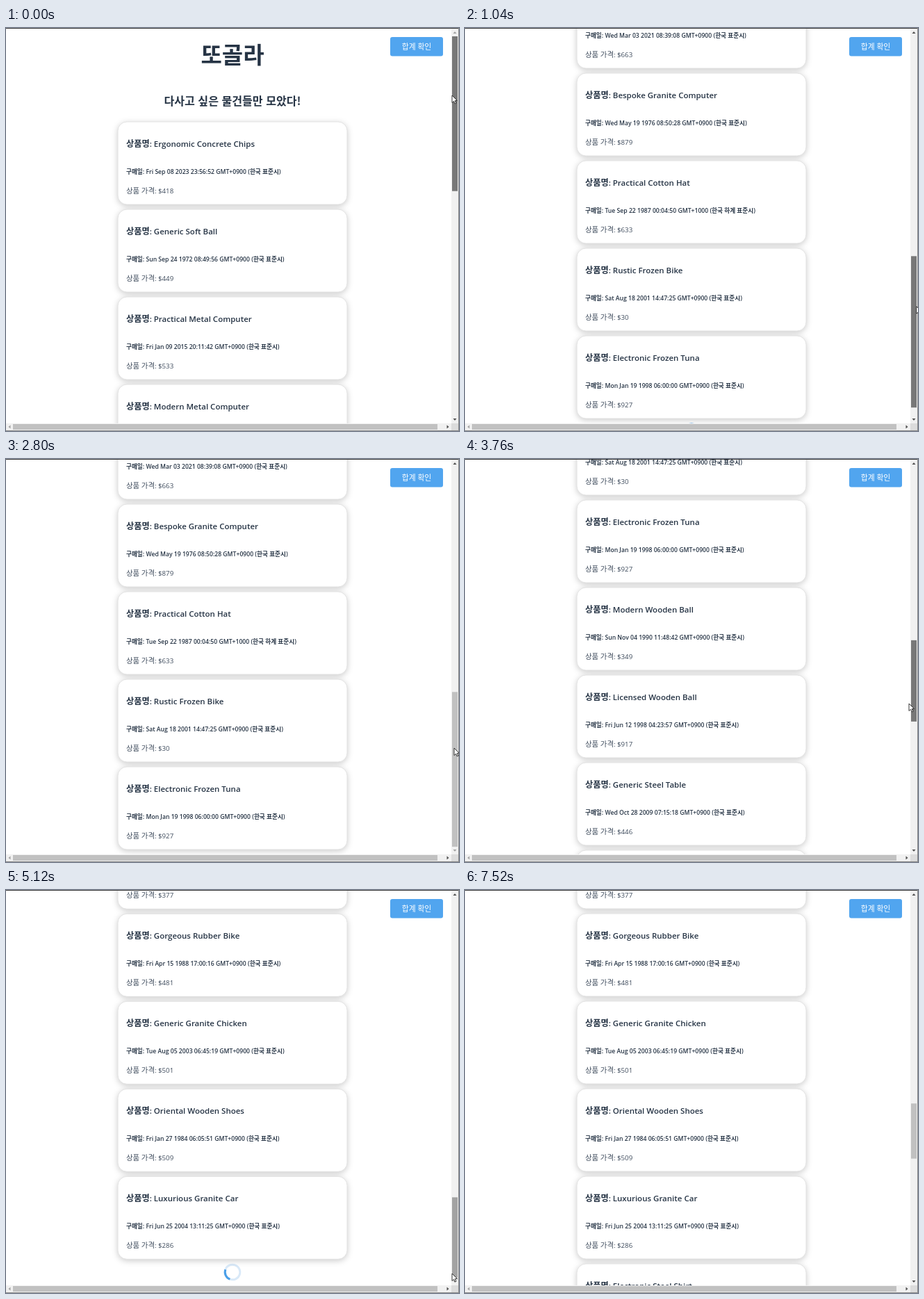
An HTML page for the animation above (7600 ms loop, 652x580 px).

```html
<!DOCTYPE html>
<html lang="ko">
<head>
<meta charset="utf-8">
<style>
  html, body { margin: 0; width: 100%; height: 100%; overflow: hidden; background: #fff; }
  svg { display: block; width: 652px; height: 580px; }
  text { font-family: 'Open Sans', 'Noto Sans', 'Noto Sans CJK KR', 'Noto Sans CJK', sans-serif; fill: #263445; white-space: pre; }
  .bold { font-weight: 600; }
  .heading { font-weight: 700; text-anchor: middle; font-family: 'Noto Sans CJK KR', 'Noto Sans CJK', sans-serif; }
  .price { fill: #3f4c5d; }
  .card { fill: #fff; stroke: #e2e2e2; filter: drop-shadow(0 2px 4.5px rgba(0, 0, 0, .2)); }
</style>
</head>
<body>
<svg id="stage" viewBox="0 0 652 580">
  <defs><clipPath id="view"><rect y="1" width="641" height="568"/></clipPath></defs>
  <g clip-path="url(#view)">
    <g id="page">
      <text class="heading" x="326" y="51" font-size="33">또골라</text>
      <text class="heading" x="326" y="111" font-size="16.1">다사고 싶은 물건들만 모았다!</text>
      <g id="spinner" fill="none" stroke-width="3">
        <circle r="10.8" stroke="#d9e9f8"/>
        <path d="M-7.64-7.64A10.8 10.8 0 0 1 7.64-7.64" stroke="#4a9fe8"/>
      </g>
    </g>
    <rect x="553" y="13" width="76" height="27.5" rx="3" fill="#51a5ef"/>
    <text x="591" y="31" font-size="10.8" text-anchor="middle" style="fill:#fff">합계 확인</text>
  </g>
  <path d="M641 1h11v568h-11zM0 569h641v11H0z" fill="#f1f1f1"/>
  <rect x="641" y="569" width="11" height="11" fill="#dcdcdc"/>
  <rect x="10" y="570" width="611" height="8" fill="#c1c1c1"/>
  <path d="M6.500 571.500v5l-3-2.500z" fill="#a3a3a3"/>
  <path d="M634.500 571.500v5l3-2.500z" fill="#505050"/>
  <path id="up" d="M643.500 8h5l-2.500-3z"/>
  <path id="down" d="M643.500 562h5l-2.500 3z"/>
  <rect id="thumb" x="642" width="8"/>
  <path d="M0 .5H652" stroke="#3c3c3c"/>
  <path d="M651.500 0V580M0 579.500H652" stroke="#8a8a8a"/>
  <path id="cursor" d="M0 0V10.500L2.500 8.300 4.200 12 5.900 11.200 4.200 7.600H7.500Z" fill="#fff" stroke="#222" stroke-width=".9"/>
</svg>
<script>
const LOOP = 7600, STEP = 80, VIEW = 569, TRACK = 546, TRACK_TOP = 12;
const FIRST = 135, PITCH = 126, BATCH = 10, SPINNER_SPACE = 30.7;

const items = `Ergonomic Concrete Chips|Fri Sep 08 2023 23:56:52|418
Generic Soft Ball|Sun Sep 24 1972 08:49:56|449
Practical Metal Computer|Fri Jan 09 2015 20:11:42|533
Modern Metal Computer|Wed Mar 02 2016 02:26:23|623
Ergonomic Cotton Computer|Sat Jul 02 2016 18:54:19|513
Rustic Soft Soap|Wed Mar 03 2021 08:39:08|663
Bespoke Granite Computer|Wed May 19 1976 08:50:28|879
Practical Cotton Hat|Tue Sep 22 1987 00:04:50|633|summer
Rustic Frozen Bike|Sat Aug 18 2001 14:47:25|30
Electronic Frozen Tuna|Mon Jan 19 1998 06:00:00|927
Modern Wooden Ball|Sun Nov 04 1990 11:48:42|349
Licensed Wooden Ball|Fri Jun 12 1998 04:23:57|917
Generic Steel Table|Wed Oct 28 2009 07:15:18|446
Handmade Cotton Chair|Mon May 14 2012 10:32:07|725
Modern Rubber Gloves|Thu Feb 17 2005 21:08:33|158
Practical Steel Pizza|Sat Dec 07 1996 03:41:29|377
Gorgeous Rubber Bike|Fri Apr 15 1988 17:00:16|481
Generic Granite Chicken|Tue Aug 05 2003 06:45:19|501
Oriental Wooden Shoes|Fri Jan 27 1984 06:05:51|509
Luxurious Granite Car|Fri Jun 25 2004 13:11:25|286
Electronic Steel Shirt|Tue Apr 09 2013 15:22:40|394`.split('\n').map(line => line.split('|'));

const $ = id => document.getElementById(id);

function add(parent, tag, attrs, text = '') {
  const el = document.createElementNS('http://www.w3.org/2000/svg', tag);
  for (const key in attrs) el.setAttribute(key, attrs[key]);
  el.textContent = text;
  return parent.appendChild(el);
}

function labelled(parent, cls, y, koSize, latinSize, label, value) {
  const line = add(parent, 'text', { class: cls, x: 173, y });
  add(line, 'tspan', { 'font-size': koSize }, label);
  add(line, 'tspan', { 'font-size': latinSize }, ': ' + value);
}

const cards = items.map(([name, date, price, summer], i) => {
  const g = add($('page'), 'g', { transform: `translate(0 ${FIRST + i * PITCH})` });
  add(g, 'rect', { class: 'card', x: 161, y: 0, width: 330, height: 119, rx: 13 });
  labelled(g, 'bold', 36, 12.2, 11.5, '상품명', name);
  const zone = summer ? 'GMT+1000 (한국 하계 표준시)' : 'GMT+0900 (한국 표준시)';
  labelled(g, 'bold', 75, 8.65, 8.65, '구매일', `${date} ${zone}`);
  labelled(g, 'price', 103, 10.4, 9.7, '상품 가격', '$' + price);
  return g;
});

// Keys are [time, ...values], joined by straight lines; the scroll is also held to the page end.
const scrollKeys = [[0, 0], [320, 62], [640, 223], [1040, 826], [1120, 857], [2640, 857], [3200, 826],
  [3760, 1210], [4440, 2086], [4480, 2117]];
const cursorKeys = [[0, 642, 97], [640, 648, 204], [1120, 650, 440], [1520, 651, 504], [2000, 654, 500],
  [2640, 650, 450], [2800, 645, 416], [3200, 642, 273], [3760, 639, 352], [4480, 641, 537],
  [5120, 642, 552], [5760, 642, 552], [6080, 656, 540]];
const thumbColours = [[0, '#787878'], [1280, '#a3a3a3'], [1760, '#c1c1c1'], [3120, '#787878'],
  [4800, '#a3a3a3'], [5920, '#c1c1c1']];
const spinners = [[1040, 2640], [4440, 5840]];
const loads = [2960, 5840];

function sample(keys, t) {
  const i = keys.findIndex(k => k[0] > t);
  if (i < 0) return keys[keys.length - 1].slice(1);
  const a = keys[i - 1], b = keys[i], p = (t - a[0]) / (b[0] - a[0]);
  return a.slice(1).map((v, n) => v + (b[n + 1] - v) * p);
}

function draw(t) {
  const count = BATCH * (1 + loads.filter(at => t >= at).length);
  const spin = spinners.find(([from, to]) => t >= from && t < to);
  const total = FIRST + count * PITCH + (spin ? SPINNER_SPACE : 0);
  const limit = total - VIEW;
  const scroll = Math.min(sample(scrollKeys, t)[0], limit);

  $('page').setAttribute('transform', `translate(0 ${-scroll})`);
  cards.forEach((card, i) => card.setAttribute('display', i < count ? 'inline' : 'none'));
  $('spinner').setAttribute('display', spin ? 'inline' : 'none');
  if (spin) {
    const y = FIRST + count * PITCH + 11.7;
    $('spinner').setAttribute('transform', `translate(326 ${y}) rotate(${(t - spin[0]) * .36})`);
  }

  const thumb = $('thumb');
  thumb.setAttribute('y', TRACK_TOP + scroll * TRACK / total);
  thumb.setAttribute('height', VIEW * TRACK / total);
  thumb.setAttribute('fill', thumbColours.filter(([at]) => t >= at).pop()[1]);
  $('up').setAttribute('fill', scroll > 0 ? '#505050' : '#a3a3a3');
  $('down').setAttribute('fill', scroll < limit ? '#505050' : '#a3a3a3');
  $('cursor').setAttribute('transform', `translate(${sample(cursorKeys, t)})`);
}

const start = performance.now();
function tick(now) {
  const t = Math.max(0, now - start) % LOOP;
  draw(Math.floor(t / STEP) * STEP);
  requestAnimationFrame(tick);
}
draw(0);
requestAnimationFrame(tick);
</script>
</body>
</html>
```
